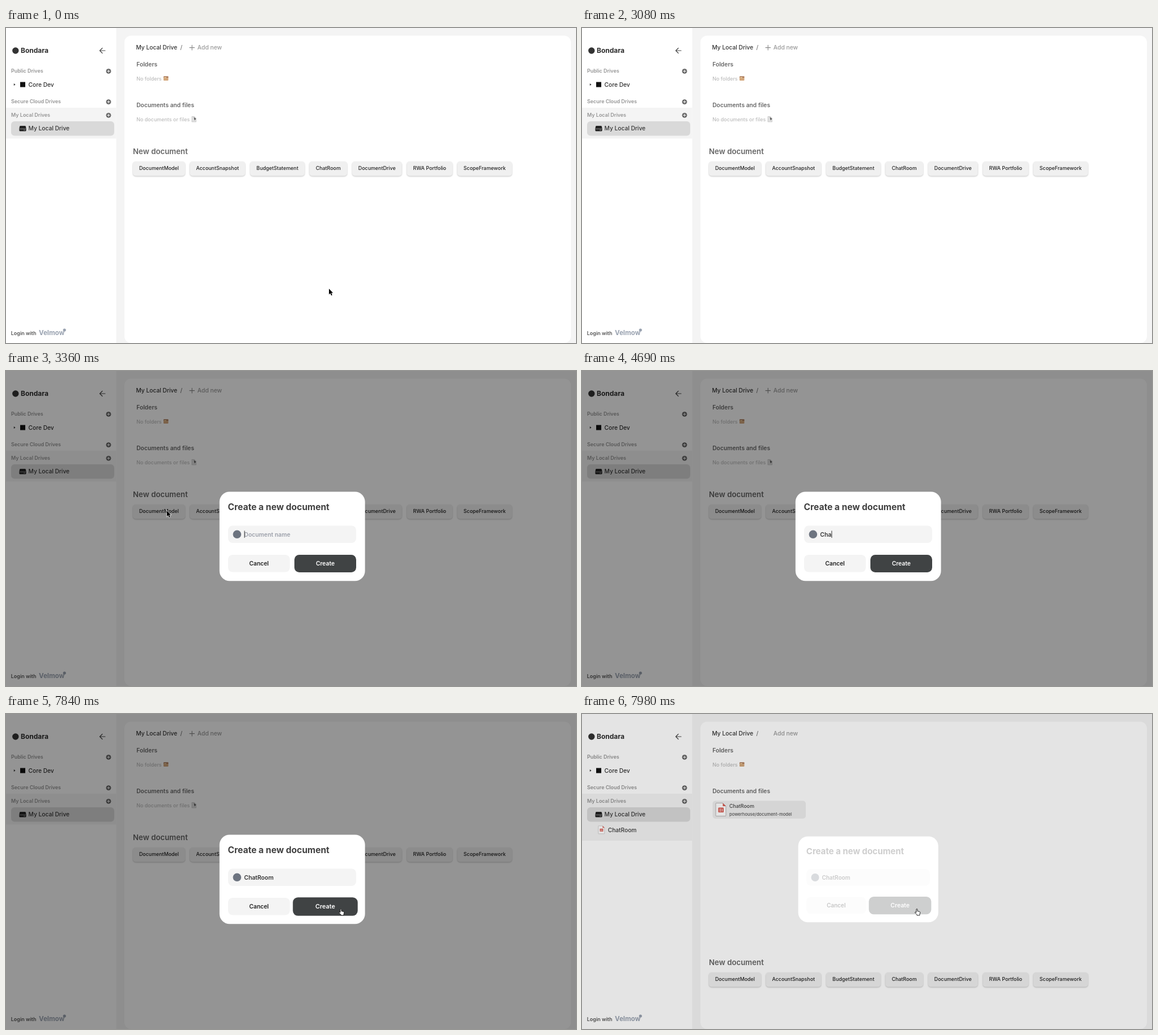
An HTML page that plays this animation: 1006 by 557 pixels, repeating every 8 s.

```html
<!DOCTYPE html>
<html lang="en">
<head>
<meta charset="utf-8">
<title>Document drive</title>
<style>
html, body { margin: 0; width: 100%; height: 100%; overflow: hidden; background: #f4f4f4; }
svg { display: block; width: 1006px; height: 557px; font-family: Inter, "Liberation Sans", sans-serif; }
.card { filter: drop-shadow(0 1.2px 1px rgba(0, 0, 0, .23)); }
</style>
</head>
<body>
<svg id="stage" viewBox="0 0 1006 557" xmlns="http://www.w3.org/2000/svg"></svg>
<script>
const LOOP = 8000, STEP = 70;
const NAME = "ChatRoom";
const KEYS = [4270, 4550, 4690, 4970, 5460, 5740, 5950, 6160];
const OPEN = 3192, CLOSE = 7910, HOVER = 7420;

// Pointer path: time, x, y
const ROUTE = [
  [0, 570, 461], [70, 594, 476], [140, 650, 488], [210, 740, 474], [280, 832, 438],
  [350, 872, 396], [420, 820, 352], [490, 710, 322], [560, 590, 306], [630, 480, 298],
  [700, 398, 295], [770, 340, 293], [840, 312, 293],
  [910, 309, 288], [1050, 295, 270], [1190, 278, 247], [1330, 267, 235], [1470, 268, 231],
  [1819, 268, 231], [1820, 280, 247], [1890, 280, 247], [2100, 284, 247],
  [6929, 284, 247], [6930, 298, 250], [7070, 362, 300], [7210, 490, 358],
  [7350, 588, 374], [7490, 596, 352], [7700, 591, 344]
];

const text = (x, y, str, size, weight, fill, extra = "") =>
  `<text x="${x}" y="${y}" font-size="${size}" font-weight="${weight}" fill="${fill}" ${extra}>${str}</text>`;
const box = (x, y, w, h, r, fill, extra = "") =>
  `<rect x="${x}" y="${y}" width="${w}" height="${h}" rx="${r}" fill="${fill}" ${extra}/>`;
const dot = (x, y, r, fill) => `<circle cx="${x}" cy="${y}" r="${r}" fill="${fill}"/>`;
const line = (d, color, width) =>
  `<path d="${d}" fill="none" stroke="${color}" stroke-width="${width}" stroke-linecap="round" stroke-linejoin="round"/>`;
const MID = 'text-anchor="middle"';

const section = (label, y) =>
  text(9, y + 3.2, label, 8.95, 600, "#959595") + dot(181, y + .9, 4.4, "#666") +
  line(`M178.8 ${y + .9}h4.4M181 ${y - 1.3}v4.4`, "#fff", 1);

const fileIcon = (x, y, s) => `<g transform="translate(${x} ${y}) scale(${s})">
  <path d="M1.5 .5H13L18.5 6V22.5Q18.5 23.5 17.5 23.5H1.5Q.5 23.5 .5 22.5V1.5Q.5 .5 1.5 .5Z" fill="#fff" stroke="#b9b4b4"/>
  <path d="M13 .5V6H18.5Z" fill="#d8594f"/>
  <rect x="5" y="8.5" width="9.5" height="8.5" rx="1" fill="#d8594f"/>
  <path d="M7 11h3M7 13h3M7 15h3M12 10.5v5" stroke="#fff" stroke-width=".9"/></g>`;

const MODELS = [
  ["DocumentModel", 224, 316], ["AccountSnapshot", 324.5, 422], ["BudgetStatement", 431, 527],
  ["ChatRoom", 535.5, 602], ["DocumentDrive", 611, 698.5], ["RWA Portfolio", 707.5, 788],
  ["ScopeFramework", 796.5, 893]
];

const sidebar = box(0, 0, 194.5, 557, 0, "#fff") +
  dot(16.8, 40, 5.7, "#333") + text(26, 44.4, "Bondara", 12, 700, "#2c2c2c") +
  line("M175 40H165.8M170 35.5L165.5 40L170 44.5", "#484848", 1.2) +
  section("Public Drives", 75.5) +
  `<path d="M13.8 98L16.6 100L13.8 102Z" fill="#333"/>` + box(25, 95.5, 9, 9, 0, "#111") +
  text(39.6, 103.7, "Core Dev", 10.2, 500, "#2e2e2e") +
  section("Secure Cloud Drives", 129.7) +
  `<rect id="local" y="141" width="194.5" height="54.5" fill="#f4f4f4"/>` +
  section("My Local Drives", 153.4) +
  box(9, 165, 182, 25.5, 6, "#d9d9d9") +
  `<path d="M25.5 173H33.5Q34.6 173 34.9 174L35.6 178V181Q35.6 182.6 34 182.6H25Q23.4 182.6 23.4 181V178L24.1 174Q24.4 173 25.5 173Z" fill="#222"/>` +
  line("M24.6 178.4H34.4M31.6 180.6h1.6", "#c4c4c4", .7) +
  text(39.6, 181.4, "My Local Drive", 10.2, 500, "#333") +
  `<g id="leaf">${fileIcon(28.5, 197.5, .61)}${text(45.7, 208.7, NAME, 10.2, 500, "#3a3a3a")}</g>` +
  text(8.8, 543, "Login with", 8.95, 600, "#555") +
  text(58, 543, "Velmow", 11.6, 700, "#99a2b0") + dot(103.2, 534, 2.6, "#99a2b0");

const main = box(209, 13.5, 788, 543.5, 12, "#fff") +
  text(229.4, 38.3, "My Local Drive", 10.25, 500, "#333") + text(307.4, 38.3, "/", 10.3, 500, "#777") +
  `<g id="plus">${line("M324 34.6h8.6M328.3 30.3v8.6", "#888", 1.1)}</g>` +
  text(337.8, 38.3, "Add new", 10.3, 500, "#9a9a9a") +
  text(230.2, 67.5, "Folders", 10.3, 600, "#696969") +
  text(230.3, 92.6, "No folders", 8.95, 500, "#bcbcbc") +
  box(278, 85.5, 8.5, 7.5, 1, "#d3a77c") + box(278, 85.5, 8.5, 2.4, .8, "#a9795c") +
  box(279, 87, 4, 1.2, 0, "#f0d3a0") +
  text(230.2, 139.7, "Documents and files", 10.3, 600, "#696969") +
  `<g id="none">${text(230.3, 164.6, "No documents or files", 8.95, 500, "#bcbcbc")}` +
  `<path d="M328 156.5h4.5l3 3V166h-7.5Z" fill="#e0e0e0" stroke="#b8b8b8" stroke-width=".6"/>` +
  `<path d="M331.5 157.5l3.8 3-2.5 3Z" fill="#555"/></g>` +
  `<g id="item">${box(230.5, 153.5, 164.5, 31.5, 5, "#efefef")}${fileIcon(235.5, 157, 1)}` +
  text(260, 166.3, NAME, 8.85, 500, "#444") +
  text(260, 180, "powerhouse/document-model", 7.6, 500, "#555") + `</g>` +
  `<g id="models">${text(224, 223.2, "New document", 13.25, 600, "#666")}` +
  MODELS.map(([label, a, b]) => box(a, 236, b - a, 25.5, 5, "#f0f0f0", 'class="card"') +
    text((a + b) / 2, 251.4, label, 8.9, 500, "#222", MID)).join("") + `</g>`;

const modal = `<g id="overlay">${box(0, 0, 1006, 557, 0, "#000", 'opacity=".42"')}<g id="modal">` +
  box(376.8, 213.5, 256.8, 157.8, 17.7, "#fff") +
  text(391.6, 245.8, "Create a new document", 15.5, 700, "#404040") +
  box(392, 273.5, 226, 30.5, 8, "#f4f4f4") + dot(407.8, 288.8, 7.3, "#6d7480") +
  text(420.3, 292.6, "", 10.3, 600, "#333", 'id="field"') +
  `<rect id="caret" y="282.5" width="1" height="12.5" fill="#333"/>` +
  box(392, 325, 109, 30.5, 8, "#f4f4f4") + text(446.5, 344.4, "Cancel", 10.3, 600, "#222", MID) +
  `<g id="create">${box(-54.5, -15.5, 109, 31, 8.5, "#404344")}` +
  text(0, 3.7, "Create", 10.3, 600, "#fff", MID) + `</g></g></g>`;

const pointers =
  `<path id="arrow" d="M0 0V10.2L2.3 8L4 12L5.8 11.2L4.1 7.4H7.2Z" fill="#000" stroke="#fff" stroke-width="1.2" paint-order="stroke"/>` +
  `<path id="hand" d="M-1 1.2Q0 0 1 1.2V4.6L4.6 5.4Q6 5.8 5.8 7.4L5 10.2V12H0V10.6L-3.2 7.4Q-3.6 6 -2 6.2L-1 7Z" fill="#fff" stroke="#111" stroke-width=".9"/>`;

document.getElementById("stage").innerHTML = box(0, 0, 1006, 557, 0, "#f4f4f4") + sidebar + main + modal + pointers;

const el = id => document.getElementById(id);
const show = (id, on) => el(id).setAttribute("display", on ? "inline" : "none");
const move = (id, value) => el(id).setAttribute("transform", value);
const clamp = v => Math.max(0, Math.min(1, v));
const easeOut = v => v * (2 - v);
const within = (t, a, b) => t >= a && t < b;

function pointerAt(t) {
  const i = ROUTE.findIndex(p => p[0] > t);
  if (i < 0) return ROUTE[ROUTE.length - 1].slice(1);
  const [t0, x0, y0] = ROUTE[i - 1], [t1, x1, y1] = ROUTE[i];
  const k = (t - t0) / (t1 - t0);
  return [x0 + (x1 - x0) * k, y0 + (y1 - y0) * k];
}

function draw(t) {
  const added = t >= CLOSE;
  show("leaf", added);
  show("item", added);
  show("none", !added);
  show("plus", !added);
  el("local").setAttribute("height", added ? 83 : 54.5);
  move("models", `translate(0 ${added ? 221 : 0})`);

  const p = added ? 1 - easeOut(clamp((t - CLOSE) / 140)) : easeOut(clamp((t - OPEN) / 150));
  show("overlay", p > 0);
  el("overlay").setAttribute("opacity", p);
  move("modal", `translate(505.2 292.4) scale(${.95 + .05 * p}) translate(-505.2 -292.4)`);
  move("create", `translate(563.5 340.5) scale(${1 + .05 * easeOut(clamp((t - HOVER) / 150))})`);

  const typed = NAME.slice(0, KEYS.filter(k => k <= t).length);
  const field = el("field");
  field.textContent = typed || "Document name";
  field.setAttribute("fill", typed ? "#333" : "#9ca0aa");
  const caretOff = within(t, 3570, 4130) || within(t, 6650, 7210) || t >= 7770;
  show("caret", !caretOff);
  if (p > 0) el("caret").setAttribute("x", 420.5 + (typed ? field.getComputedTextLength() : 0));

  const [x, y] = pointerAt(t);
  const hidden = within(t, 3080, 3150) || within(t, 4270, 6930);
  show("arrow", !hidden && t < HOVER);
  show("hand", t >= HOVER);
  move("arrow", `translate(${x} ${y})`);
  move("hand", `translate(${x} ${y})`);
}

const start = performance.now();
function tick() {
  const t = (performance.now() - start) % LOOP;
  draw(Math.floor(t / STEP) * STEP);
  requestAnimationFrame(tick);
}
tick();
</script>
</body>
</html>
```
